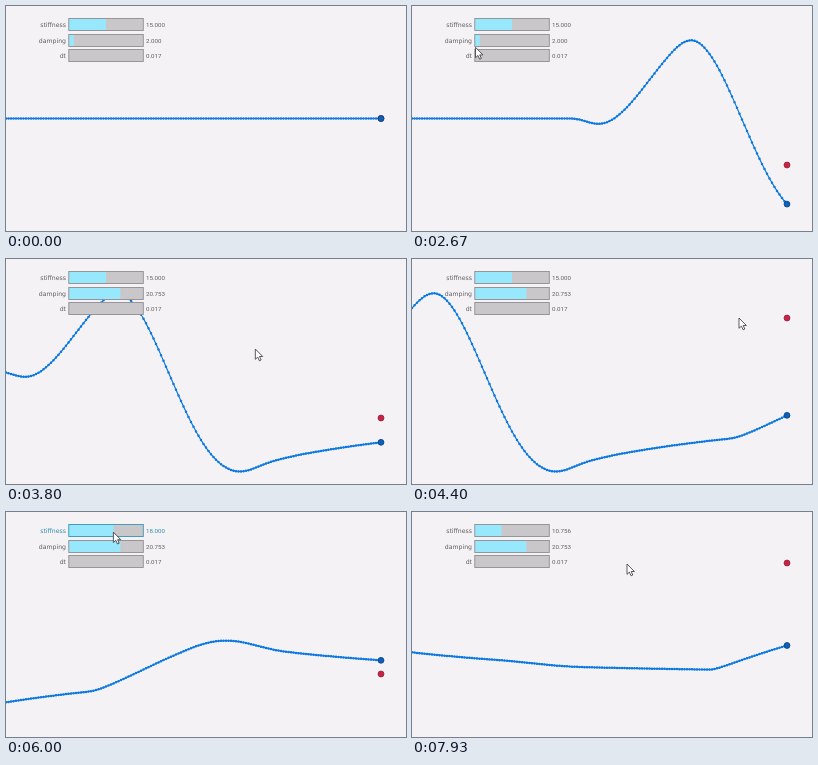
Animation, 400 px wide and 225 px high, one loop 8 s. Source, as an HTML page:

```html
<!DOCTYPE html>
<html lang="en">
<head>
<meta charset="utf-8">
<title>Spring wave</title>
<style>
  html, body { margin: 0; width: 100%; height: 100%; overflow: hidden; background: #f4f2f5; }
  svg { display: block; width: 100vw; height: 100vh; }
  text { fill: #605e62; }
  .label { font: 6.2px "DejaVu Sans", sans-serif; text-anchor: end; }
  .value { font: 6.2px Roboto, "Liberation Sans", sans-serif; }
  .track { fill: #c9c7ca; }
  .fill { fill: #97e8fd; }
  .edge { fill: none; stroke: #908e92; stroke-width: .9; }
  .hot text { fill: #2f8faa; }
  .hot .edge { stroke: #3a96b6; }
  .wave { fill: none; stroke: #0b78e0; stroke-linecap: round; stroke-linejoin: round; }
</style>
</head>
<body>
<svg viewBox="0 0 400 225">
  <rect width="400" height="225" fill="#f4f2f5"/>
  <path id="line" class="wave" stroke-width="1.2"/>
  <path id="dots" class="wave" stroke-width="2.5"/>
  <circle id="goal" cx="375" r="3" fill="#cb2145" stroke="#86203a" stroke-width=".7"/>
  <circle id="head" cx="375" r="2.9" fill="#0b62bd" stroke="#0b4488" stroke-width=".9"/>
  <g id="panel"></g>
  <path id="cursor" d="M0 0V10.3L2.4 8.1L4.1 11.8L5.8 11L4.2 7.5H7.4Z"
    fill="#fff" stroke="#333" stroke-width=".8" stroke-linejoin="round"/>
</svg>
<script>
const LOOP = 8000, FRAME = 200 / 3;
const RATE = 0.059, DT = 0.017;   // simulation steps per ms, seconds per step
const HEAD_X = 375, GAP = 2.5, REST = 112.5;
const BAR_X = 62.8, BAR_W = 74.5, BAR_H = 12, MAX = 30;
const $ = id => document.getElementById(id);

// Straight runs between [time, value, ...] keys, held at both ends.
function track(keys, col = 1) {
  return t => {
    const i = keys.findIndex(k => k[0] > t);
    if (i === 0) return keys[0][col];
    if (i < 0) return keys[keys.length - 1][col];
    const a = keys[i - 1], b = keys[i];
    return a[col] + (b[col] - a[col]) * (t - a[0]) / (b[0] - a[0]);
  };
}

// Where the hand drags the red ball.
const goal = track([
  [1200, REST], [1207, 146], [1285, 146], [1405, 48.5], [1880, 48.5], [2036, 159],
  [4000, 159], [4100, 90], [4400, 59], [4720, 56], [5080, 183], [5220, 186], [5340, 162],
  [7400, 162], [7440, 55], [7600, 51]
]);
const stiffness = track([
  [5950, 15], [6200, 30], [6350, 30], [6550, 10.9], [6800, 10.507], [6950, 10.756]
]);
const damping = track([[2840, 2], [3080, 18.5], [3200, 19.004], [3330, 20.753]]);

const mouse = [
  [900, 300, 228], [1207, 306, 146], [1405, 320, 48], [1870, 338, 52], [2000, 344, 149],
  [2040, 340, 159], [2530, 60, 48], [2840, 68, 33], [3200, 112, 33], [3400, 116, 34],
  [4000, 316, 118], [4400, 327, 59], [4720, 327, 56], [5200, 330, 186], [5340, 322, 162],
  [5950, 100, 20], [6200, 137, 21], [6350, 137, 21], [6550, 90, 23], [6950, 90, 23],
  [7400, 206, 53], [7930, 215, 52]
];
const mouseX = track(mouse), mouseY = track(mouse, 2);

// Heights of the blue ball, pulled to the red one by a damped spring.
const heights = [REST];
for (let n = 1, y = REST, v = 0; n <= LOOP * RATE + 1; n++) {
  const t = n / RATE;
  v += (stiffness(t) * (goal(t) - y) - damping(t) * v) * DT;
  y += v * DT;
  heights.push(y);
}

const sliders = [
  { name: "stiffness", at: stiffness, hot: [5850, 7000] },
  { name: "damping", at: damping, hot: [2750, 3450] },
  { name: "dt", at: () => DT, hot: [0, 0] }
];

sliders.forEach((s, i) => {
  const y = 12.5 + Math.round(i * 15.6);
  const g = document.createElementNS("http://www.w3.org/2000/svg", "g");
  const box = (cls, w) =>
    `<rect class="${cls}" x="${BAR_X}" y="${y}" width="${w}" height="${BAR_H}"/>`;
  g.innerHTML = box("track", BAR_W) + box("fill", 0) + box("edge", BAR_W)
    + `<text class="label" x="60" y="${y + 8.1}">${s.name}</text>`
    + `<text class="value" x="140" y="${y + 8.1}"></text>`;
  $("panel").append(g);
  Object.assign(s, { g, bar: g.querySelector(".fill"), text: g.querySelector(".value") });
});

function draw(t) {
  const now = Math.round(t * RATE);
  const points = [];
  for (let k = 0; k * GAP < HEAD_X + GAP; k++) {
    points.push(`${HEAD_X - k * GAP} ${heights[Math.max(0, now - k)].toFixed(2)}`);
  }
  $("line").setAttribute("d", "M" + points.join("L"));
  $("dots").setAttribute("d", points.map(p => `M${p}h0`).join(""));
  $("head").setAttribute("cy", heights[now]);
  $("goal").setAttribute("cy", goal(t));
  $("cursor").setAttribute("transform", `translate(${mouseX(t)} ${mouseY(t)})`);
  for (const s of sliders) {
    const value = s.at(t);
    s.bar.setAttribute("width", value / MAX * BAR_W);
    s.text.textContent = value.toFixed(3);
    s.g.classList.toggle("hot", t >= s.hot[0] && t < s.hot[1]);
  }
}

const start = performance.now();
function tick() {
  const t = (performance.now() - start) % LOOP;
  draw(Math.floor((t + 4) / FRAME) * FRAME % LOOP);
  requestAnimationFrame(tick);
}
tick();
</script>
</body>
</html>
```
